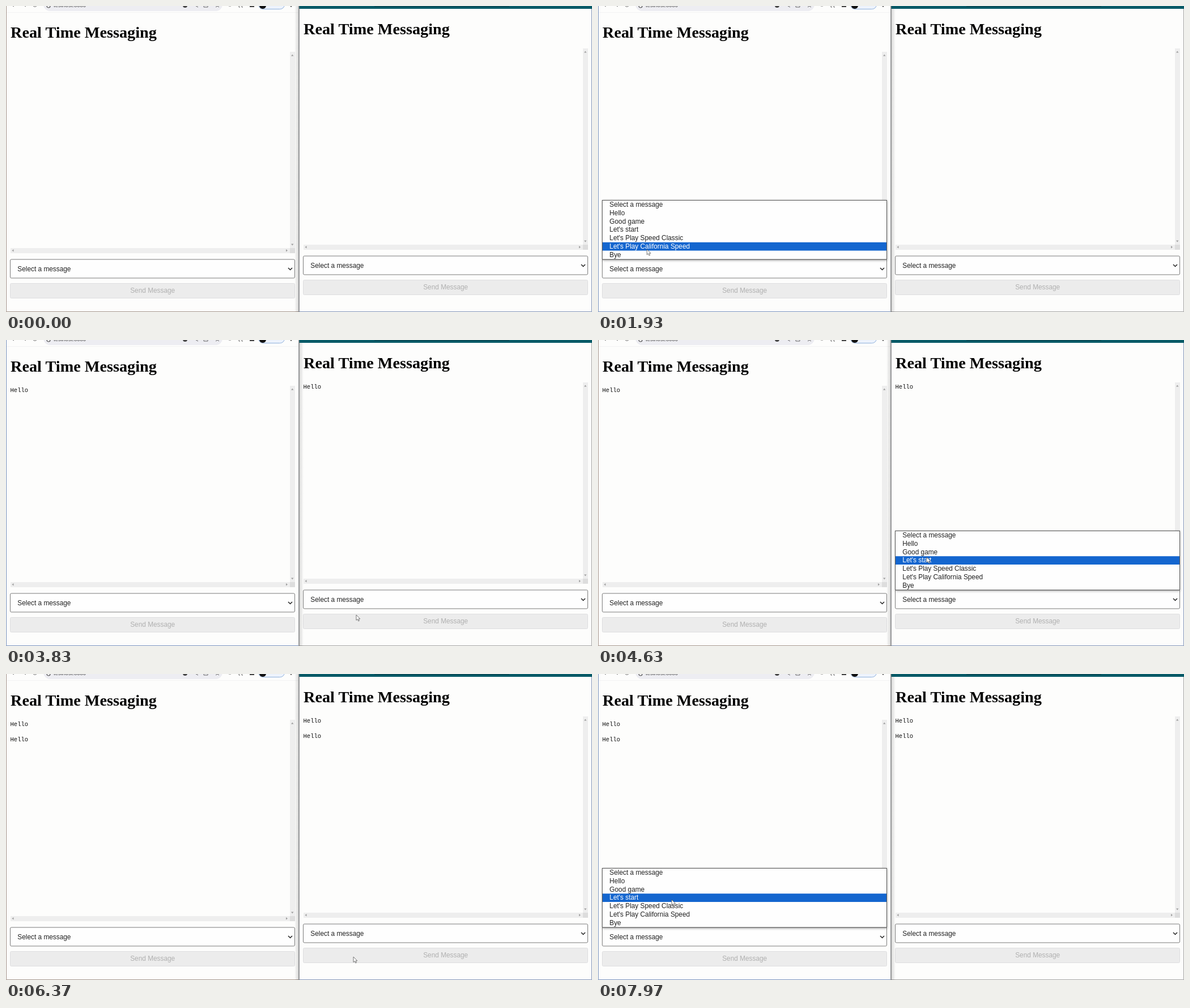
An HTML page for the animation above (8000 ms loop, 1034 by 541 pixels).

```html
<!DOCTYPE html>
<html lang="en">
<head>
<meta charset="utf-8">
<title>Messaging</title>
<style>
  html, body { margin: 0; width: 100%; height: 100%; overflow: hidden; background: #fdfdfc; }
  svg { display: block; width: 100%; height: 100%; }
  text { font: 11.85px "Liberation Sans", Arial, sans-serif; fill: #222; white-space: pre; }
  .title { font: bold 28.25px "Liberation Serif", "Times New Roman", serif; fill: #000; }
  .log { font: 10.55px "Liberation Mono", "Courier New", monospace; fill: #111; }
  .tiny { font-size: 9.5px; fill: #444; }
</style>
</head>
<body>
<svg id="stage" viewBox="0 0 1034 541" preserveAspectRatio="none">
  <defs>
    <linearGradient id="fade"><stop stop-color="#000" stop-opacity="0"/><stop offset="1" stop-color="#000" stop-opacity=".16"/></linearGradient>
    <filter id="soft" x="-5%" y="-10%" width="110%" height="120%"><feGaussianBlur stdDeviation="2"/></filter>
  </defs>
  <rect width="1034" height="541" fill="#fdfdfc"/>
</svg>
<script>
const LOOP = 8000;
const OPTIONS = ["Select a message", "Hello", "Good game", "Let's start",
  "Let's Play Speed Classic", "Let's Play California Speed", "Bye"];
const LIST_TOP = 344, ROW = 14.75;
const stage = document.getElementById("stage");

function add(parent, tag, attrs = {}, content = "") {
  const node = document.createElementNS("http://www.w3.org/2000/svg", tag);
  set(node, attrs);
  node.textContent = content;
  parent.append(node);
  return node;
}
function set(node, attrs) {
  for (const key in attrs) node.setAttribute(key, attrs[key]);
}
const show = (node, on) => set(node, { visibility: on ? "visible" : "hidden" });
const box = (parent, x, y, width, height, fill, more = {}) =>
  add(parent, "rect", { x, y, width, height, fill, ...more });
const line = (parent, d, stroke, width = 1) =>
  add(parent, "path", { d, stroke, "stroke-width": width, fill: "none" });
const label = (parent, x, y, content, more = {}) => add(parent, "text", { x, y, ...more }, content);
const shape = (parent, d, fill) => add(parent, "path", { d, fill });

function drawScrollbars(g) {
  box(g, 501, 81, 9, 347, "#eeeeee");
  box(g, 8, 428, 493, 9, "#eeeeee");
  box(g, 501, 428, 9, 9, "#dddddd");
  shape(g, "M503 88.500h4.500l-2.250-3z M503 420.500h4.500l-2.250 3z M13.500 430v4.500l-3-2.250z M494 430v4.500l3-2.250z", "#a0a0a0");
}

// Both panes share one layout; the second is only shifted.
function createPane(dx, dy) {
  const g = add(stage, "g", { transform: `translate(${dx} ${dy})` });
  label(g, 8, 55.5, "Real Time Messaging", { class: "title" });
  const messages = [92, 119].map(y => label(g, 7.5, y, "Hello", { class: "log" }));
  drawScrollbars(g);

  box(g, 7.5, 448, 502, 33, "#fefefe", { rx: 2, stroke: "#7b7b7b" });
  const value = label(g, 20.3, 469, "");
  line(g, "M498 463l3.500 3.500l3.500-3.500", "#222", 1.5);
  const button = box(g, 7.5, 490.5, 502, 26, "#ececec", { rx: 2, stroke: "#dedee0" });
  const caption = label(g, 258.7, 507.2, "Send Message", { "text-anchor": "middle" });

  const popup = add(g, "g");
  box(popup, 8, 344, 502, 106, "#000", { opacity: 0.3, filter: "url(#soft)" });
  box(popup, 7.5, 343.5, 502, 104.5, "#fefefe", { stroke: "#555" });
  const highlight = box(popup, 8, LIST_TOP, 501, ROW, "#1466cf");
  const items = OPTIONS.map((name, i) => label(popup, 20.3, LIST_TOP + 11 + i * ROW, name));

  return ({ open, hover, choice, count }) => {
    messages.forEach((node, i) => show(node, i < count));
    value.textContent = OPTIONS[choice];
    set(button, { fill: choice ? "#efefef" : "#ececec", stroke: choice ? "#8a8a8a" : "#dedee0" });
    caption.style.fill = choice ? "#111" : "#b0b0b0";
    show(popup, open);
    set(highlight, { y: LIST_TOP + hover * ROW });
    items.forEach((node, i) => node.style.fill = i === hover ? "#fff" : "#222");
  };
}

function drawToolbar() {
  const g = add(stage, "g");
  box(g, 66, -18, 316, 27, "#ededf2", { rx: 12 });
  line(g, "M12 0l2 1M33 0l2 1M48 0q3 3 6 0", "#777");
  line(g, "M72 0a3 3 0 0 0 6 0", "#555", 1.2);
  label(g, 84, 1.7, "testhost:8080", { class: "tiny" });
  add(g, "circle", { cx: 316, cy: -1, r: 4, fill: "#444" });
  line(g, "M335 0l4 2M349 -1v3h7v-3M370 2l3-2l3 2M393 0h4M411 -1v3h2M416 -1v3h2", "#666");
  box(g, 430, -3, 8, 5, "#444");
  box(g, 445.5, -13, 46, 18.5, "#edf3fc", { rx: 8, stroke: "#8fb0dc" });
  add(g, "circle", { cx: 453, cy: -1, r: 6, fill: "#111" });
  add(g, "circle", { cx: 503, cy: 0.5, r: 1.2, fill: "#555" });
  line(g, "M1 11.500H516", "#f3f3f3");
}

drawToolbar();
box(stage, 517, 0, 517, 5, "#045966");
box(stage, 650, 0, 238, 1, "#073c46");
const drawLeft = createPane(0, 0);
const drawRight = createPane(517, -6);

const leftEdge = line(stage, "M.5 0V540.500H516", "#999");
const rightEdge = line(stage, "M517 540.500H1033.500V5", "#999");
const shadowLeft = box(stage, 509, 0, 8, 541, "url(#fade)");
const shadowRight = box(stage, -525, 5, 8, 536, "url(#fade)", { transform: "scale(-1 1)" });
line(stage, "M517 0V541", "#737578", 1.4);
const cursor = add(stage, "path", {
  d: "M0 0V9.500L2.200 7.500L3.800 11L5.400 10.300L3.900 7H6.800Z",
  fill: "#fff", stroke: "#555", "stroke-width": 0.8
});

// Pointer stops: time, x, y
const PATH = [
  [900, 170, 545], [1150, 104, 463], [1700, 104, 463], [2150, 70, 400],
  [2450, 62, 368], [2720, 62, 368], [3050, 110, 497], [3430, 110, 497],
  [3830, 618, 486], [4080, 600, 455], [4230, 600, 455], [4630, 580, 384],
  [4850, 575, 358], [5030, 575, 358], [5480, 613, 500], [6450, 613, 500],
  [7050, 125, 461], [7400, 125, 461], [7960, 130, 399]
];

function pointerAt(t) {
  const next = PATH.findIndex(stop => stop[0] > t);
  if (next < 0) return PATH[PATH.length - 1].slice(1);
  if (next === 0) return PATH[0].slice(1);
  const [t0, x0, y0] = PATH[next - 1], [t1, x1, y1] = PATH[next];
  const p = (t - t0) / (t1 - t0), ease = p * p * (3 - 2 * p);
  return [x0 + (x1 - x0) * ease, y0 + (y1 - y0) * ease];
}

const within = (t, from, to) => t >= from && t < to;

function hovered(y) {
  const row = Math.floor((y - LIST_TOP) / ROW);
  return row >= 0 && row < OPTIONS.length ? row : 0;
}

function render(t) {
  const [x, y] = pointerAt(t);
  const count = (t >= 3400) + (t >= 5750);
  const leftFocused = within(t, 1230, 4180) || t >= 7230;

  drawLeft({
    open: within(t, 1230, 2700) || t >= 7230,
    hover: hovered(y), choice: +within(t, 2700, 3400), count
  });
  drawRight({
    open: within(t, 4180, 5010),
    hover: hovered(y + 6), choice: +within(t, 5010, 5750), count
  });
  set(leftEdge, { stroke: leftFocused ? "#7891bd" : "#a3948b" });
  set(rightEdge, { stroke: leftFocused ? "#a3a3a3" : "#8295b8" });
  show(shadowLeft, !leftFocused);
  show(shadowRight, leftFocused);
  show(cursor, t >= PATH[0][0]);
  set(cursor, { transform: `translate(${x} ${y})` });
}

const start = performance.now();
function tick(now) {
  render(Math.max(0, now - start) % LOOP);
  requestAnimationFrame(tick);
}
render(0);
requestAnimationFrame(tick);
</script>
</body>
</html>
```
